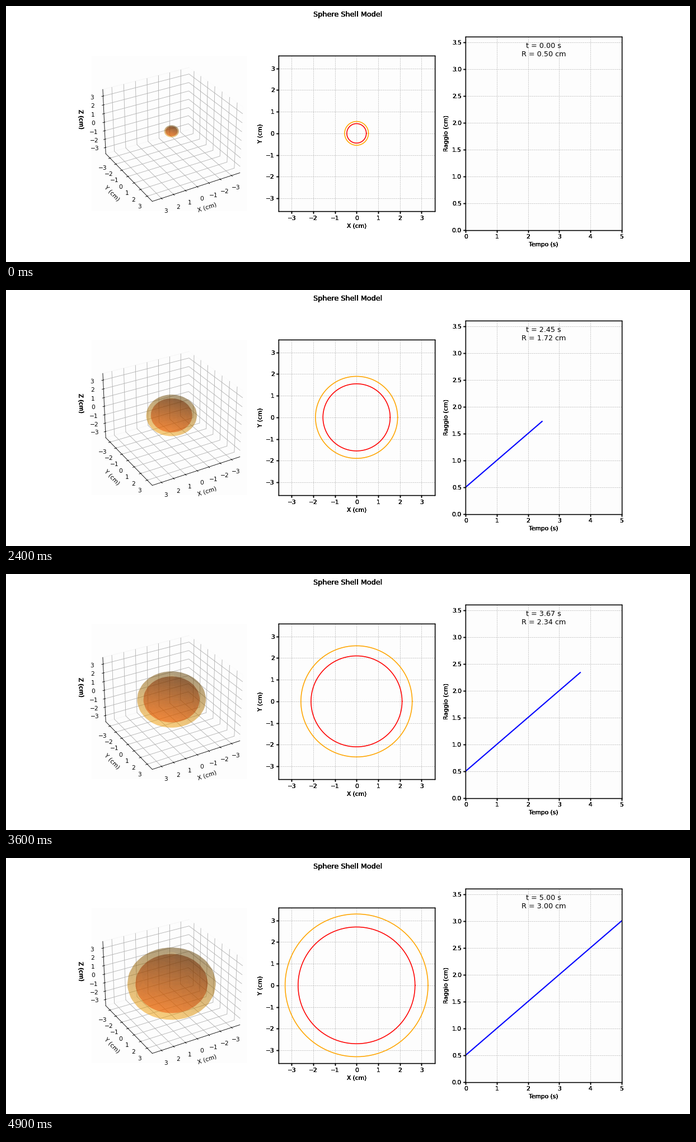
Write a matplotlib script that moves like this. It is 1222 by 458 pixels and loops after 5000 ms.

```python
import numpy as np
import matplotlib.pyplot as plt
from matplotlib.animation import FuncAnimation
from matplotlib.colors import to_rgba
from mpl_toolkits.mplot3d.art3d import Poly3DCollection

DPI = 76.375
FRAMES = 50
LIM = 3.6
PANEL = "#fdfdfd"

times = np.linspace(0, 5, FRAMES)
radii = np.linspace(0.5, 3, FRAMES)
ticks = range(-3, 4)


def overprint(artist, passes=4):
    """Draw an artist several times so its soft edges build up."""
    draw = artist.draw

    def repeat(renderer):
        for _ in range(passes):
            draw(renderer)

    artist.draw = repeat


def sphere_quads(n=30):
    u, v = np.meshgrid(np.linspace(0, 2 * np.pi, n), np.linspace(0, np.pi, n))
    p = np.stack([np.cos(u) * np.sin(v), np.sin(u) * np.sin(v), np.cos(v)], -1)
    corners = [p[:-1, :-1], p[:-1, 1:], p[1:, 1:], p[1:, :-1]]
    return np.stack(corners, 2).reshape(-1, 4, 3)


fig = plt.figure(figsize=(1222.001 / DPI, 458.001 / DPI), dpi=DPI, facecolor="white")
space = fig.add_subplot(131, projection="3d")
plane = fig.add_subplot(132)
chart = fig.add_subplot(133)
fig.subplots_adjust(left=0.125, right=0.9, bottom=0.125, top=0.88, wspace=0.2)
overprint(fig.suptitle("Sphere Shell Model"))

# 3D view
space.set_facecolor(PANEL)
space.view_init(elev=30, azim=60)
quads = sphere_quads()
shells = []
for color, factor in (("red", 0.9), ("orange", 1.1)):
    shell = Poly3DCollection(quads, facecolors=to_rgba(color, 0.3), shade=True)
    space.add_collection3d(shell)
    shells.append((shell, factor))
edge = LIM * 25 / 24
space.set(xlim=(-edge, edge), ylim=(-edge, edge), zlim=(-edge, edge),
          xticks=ticks, yticks=ticks, zticks=ticks,
          xlabel="X (cm)", ylabel="Y (cm)", zlabel="Z (cm)")
for axis in (space.xaxis, space.yaxis, space.zaxis):
    axis.pane.fill = False
    axis.pane.set_edgecolor("#eeeeee" if axis is space.yaxis else "#fafafa")
overprint(space.zaxis.label)

# Cross-section
plane.set_aspect("equal")
plane.set(xlim=(-LIM, LIM), ylim=(-LIM, LIM), xticks=ticks, yticks=ticks,
          xlabel="X (cm)", ylabel="Y (cm)")
angle = np.linspace(0, 2 * np.pi, 100)
rings = [(plane.plot([], [], color=c, lw=1.5)[0], f)
         for c, f in (("red", 0.9), ("orange", 1.1))]

# Radius against time
chart.set(xlim=(0, 5), ylim=(0, LIM), xticks=range(6), yticks=np.arange(0, 3.6, 0.5),
          xlabel="Tempo (s)", ylabel="Raggio (cm)")
curve, = chart.plot([], [], color="blue", lw=2)
readout = chart.text(0.5, 0.9, "", transform=chart.transAxes, ha="center", fontsize=12)

for ax in (plane, chart):
    ax.set_facecolor(PANEL)
    ax.grid(True, ls="--", lw=0.6, color="#b0b0b0")
    ax.tick_params(width=1.2)
    for spine in ax.spines.values():
        spine.set_linewidth(1.2)
    overprint(ax)


def update(i):
    t, r = times[i], radii[i]
    for shell, factor in shells:
        shell.set_verts(quads * (factor * r))
    for ring, factor in rings:
        ring.set_data(factor * r * np.cos(angle), factor * r * np.sin(angle))
    if i:
        curve.set_data(times[:i + 1], radii[:i + 1])
    else:
        curve.set_data([], [])
    readout.set_text(f"t = {t:.2f} s\nR = {r:.2f} cm")


anim = FuncAnimation(fig, update, frames=FRAMES, interval=100, repeat=True)
plt.show()
```
